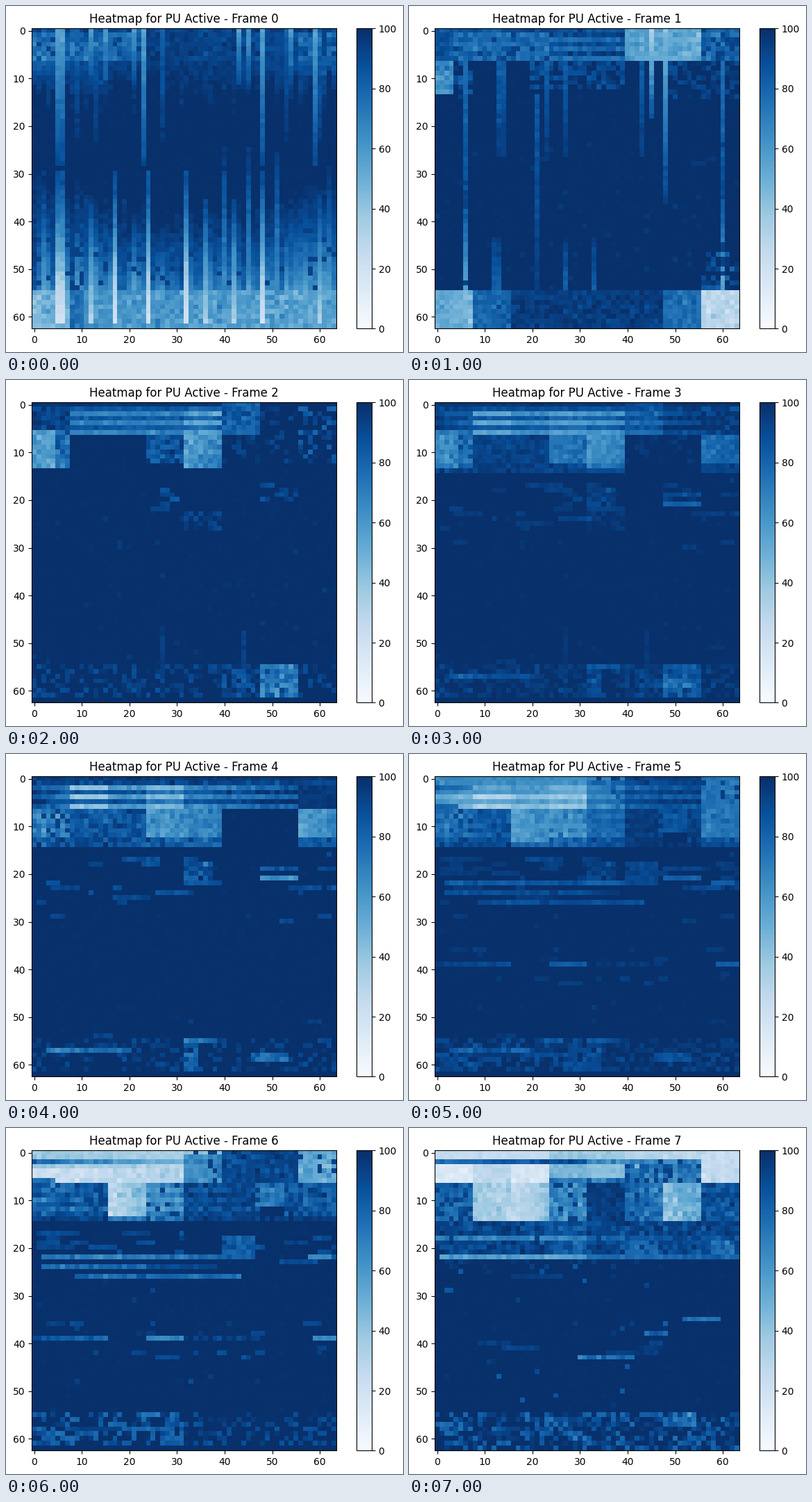
A matplotlib script that plays this animation: 572x498 px, repeating every 8000 ms.

```python
import numpy as np
import matplotlib.pyplot as plt
from matplotlib.animation import FuncAnimation

W, H, DPI = 572, 498, 100
ROWS, COLS = 63, 64
TOP, MID, LOW, BASE = slice(0, 7), slice(7, 15), slice(15, 24), slice(55, 62)
INNER = slice(24, 55)


class Grid:
    """Activity map of eight sections, each eight columns wide."""

    def __init__(self, seed):
        self.rng = np.random.default_rng(seed)
        self.v = 100 - np.abs(self.rng.normal(0, 0.5, (ROWS, COLS)))

    def part(self, rows, a, b):
        if isinstance(rows, int):
            rows = slice(rows, rows + 1)
        return self.v[rows, round(8 * a):round(8 * b)]

    def block(self, rows, a, b, level, end=None, noise=4, stripe=0):
        """Fill sections a to b, from level to end; stripe darkens every other row."""
        p = self.part(rows, a, b)
        ramp = np.linspace(level, level if end is None else end, p.shape[1])
        p[:] = ramp + self.rng.normal(0, noise, p.shape)
        p[1::2] += stripe

    def sparks(self, rows, a, b, level, share):
        p = self.part(rows, a, b)
        light = self.rng.uniform(level, 98, p.shape)
        p[:] = np.where(self.rng.random(p.shape) < share, np.minimum(p, light), p)

    def gaps(self, rows, a, b, share):
        p = self.part(rows, a, b)
        p[:] = np.where(self.rng.random(p.shape) < share, np.maximum(p, 93), p)

    def dashes(self, rows, a, b, count, level, longest=8):
        for _ in range(count):
            r = self.rng.integers(rows.start, rows.stop)
            c = self.rng.uniform(a, b)
            size = self.rng.integers(1, longest + 1) / 8
            self.block(int(r), c, min(c + size, b), self.rng.uniform(level, 95), noise=2)

    def streak(self, c, r0, r1, start, end, power=1.0):
        t = np.linspace(0, 1, r1 - r0)
        fade = start + (end - start) * t ** power + self.rng.normal(0, 2, r1 - r0)
        self.v[r0:r1, c] = np.minimum(self.v[r0:r1, c], fade)


def stage_0():
    g = Grid(10)
    g.block(TOP, 0, 3, 79, noise=6)
    g.block(TOP, 3, 7, 95, 90, noise=3)
    g.block(TOP, 7, 8, 80, noise=6)
    g.block(0, 0, 8, 88, 96)
    g.gaps(TOP, 0, 8, 0.12)
    g.block(BASE.start, 0, 8, 58)
    g.block(slice(55, 63), 0, 1, 49, noise=5)
    g.block(slice(55, 63), 1, 4, 61, noise=5)
    g.block(slice(55, 63), 4, 8, 58, 54, noise=5)
    g.block(slice(55, 63), 1, 1.4, 74)

    for c in range(COLS):
        mid = np.sin(np.pi * c / COLS)
        g.streak(c, 7, 10 + int(g.rng.integers(0, 9)), 82 + 14 * mid, 98)
        start = 29 + int(9 * mid + g.rng.integers(0, 6))
        g.streak(c, start, 55, 98, g.rng.normal(60 + 13 * mid, 8), 1.3)
    g.gaps(slice(36, 55), 0, 8, 0.08)
    g.gaps(slice(38, 55), 1, 1.4, 0.5)

    for c in (5, 6, 23, 48, 59):
        g.streak(c, 0, 29, 56, 90)
    for c in (12, 15, 21, 43, 45, 54):
        g.streak(c, 0, 14, 58, 96)
    for c in (9, 13, 27, 53, 60):
        g.streak(c, 0, 24, 82, 96)
    for c in (5, 6, 17, 24, 32, 48):
        g.streak(c, 30, 55, 88, 30, 1.3)
        g.streak(c, 55, 62, 28, 18)
    for c in (12, 36, 42, 60):
        g.streak(c, 36, 62, 92, 32)
    for c in (40, 45, 51):
        g.streak(c, 25, 55, 96, 64)
    return g.v


def stage_1():
    g = Grid(21)
    g.block(TOP, 0, 0.5, 88)
    g.block(TOP, 0.5, 3, 78, noise=5)
    g.block(TOP, 3, 5, 78, stripe=13)
    g.block(TOP, 5, 7, 58, 52, noise=5)
    g.block(TOP, 7, 8, 80, noise=6)
    g.block(0, 0, 5, 88)
    g.gaps(TOP, 1, 3, 0.1)
    g.gaps(TOP, 7, 8, 0.2)
    g.block(slice(7, 14), 0, 0.5, 64, noise=5)
    g.sparks(MID, 0.5, 1, 76, 0.6)
    g.sparks(slice(7, 13), 2.5, 5, 84, 0.65)
    g.sparks(MID, 6, 8, 88, 0.5)
    g.sparks(INNER, 0, 8, 95, 0.02)
    g.sparks(slice(47, 55), 7, 8, 78, 0.6)

    base = slice(55, 63)
    g.block(base, 0, 1, 54, 47)
    g.block(base, 1, 2, 81)
    g.block(base, 2, 6, 95, noise=3)
    g.block(base, 6, 7, 77)
    g.block(base, 7, 8, 29)

    for c in (13, 14, 23, 27, 43):
        g.streak(c, 7, 27, 82, 95)
    for c in (12, 13, 27, 33):
        g.streak(c, 44, 55, 94, 82)
    for c in (6, 60):
        g.streak(c, 7, 35, 76, 89)
        g.streak(c, 35, 55, 89, 54)
        g.gaps(INNER, c / 8, (c + 1) / 8, 0.15)
    g.streak(21, 14, 55, 86, 94)
    g.streak(45, 0, 19, 32, 86)
    g.streak(48, 0, 37, 46, 94)
    return g.v


def stage_2():
    g = Grid(32)
    g.block(TOP, 0, 1, 94)
    g.block(TOP, 1, 4, 69, stripe=16, noise=3)
    g.block(TOP, 4, 5, 57, stripe=24)
    g.block(TOP, 5, 6, 83, noise=5)
    g.block(0, 0, 5, 98, noise=1)
    g.block(slice(6, 14), 0, 0.6, 58, noise=5)
    g.block(slice(6, 14), 0.6, 1, 77, noise=8)
    g.block(slice(7, 13), 3, 4, 86, noise=6)
    g.block(slice(7, 14), 4, 5, 58, 68, noise=6)
    g.sparks(slice(0, 13), 5, 7, 90, 0.25)
    g.sparks(slice(1, 13), 7, 8, 78, 0.5)

    g.dashes(slice(17, 23), 3, 4, 6, 84, 4)
    g.dashes(slice(17, 22), 6, 7, 8, 84, 4)
    g.sparks(slice(23, 27), 4, 5, 88, 0.5)
    g.sparks(INNER, 0, 8, 95, 0.01)
    g.sparks(BASE, 0, 8, 87, 0.35)
    g.sparks(BASE, 5, 6, 78, 0.5)
    g.block(BASE, 6, 7, 73, noise=8)
    for c in (27, 44):
        g.streak(c, 47, 62, 96, 91)
    return g.v


def stage_4():
    g = Grid(43)
    g.block(TOP, 0, 1, 86, 70, stripe=14)
    for a, level, stripe in [(1, 40, 44), (2, 60, 28), (3, 47, 26)]:
        g.block(TOP, a, a + 1, level, stripe=stripe, noise=3)
    g.block(TOP, 4, 7, 66, 82, stripe=18)
    g.block(TOP, 7, 8, 96, noise=2)
    g.block(0, 0, 8, 96, noise=2)
    g.block(1, 0, 8, 92)
    g.block(MID, 0, 1, 70, noise=7)
    g.block(MID, 1, 3, 85, noise=5)
    g.block(MID, 3, 5, 60, 70, noise=5)
    g.block(MID, 7, 8, 56, 68, noise=5)
    g.block(slice(13, 15), 0, 5, 84, noise=6)
    g.block(slice(13, 15), 7, 8, 84)
    g.gaps(MID, 0, 3, 0.15)

    g.dashes(slice(17, 26), 0, 5, 16, 87)
    g.block(slice(18, 23), 4, 4.75, 87, noise=6)
    g.block(19, 6, 7, 86)
    g.block(21, 6, 7, 67)
    g.dashes(LOW, 6, 8, 6, 88)
    g.dashes(INNER, 0, 8, 10, 91, 4)
    g.sparks(BASE, 0, 8, 88, 0.3)
    g.block(57, 0.4, 2.6, 68, 80)
    g.block(55, 4, 4.9, 75)
    g.block(slice(56, 62), 4, 4.4, 83, noise=6)
    g.block(slice(58, 60), 5.8, 6.8, 78, noise=6)
    return g.v


def stage_6():
    g = Grid(54)
    g.block(TOP, 0, 4, 20, 33)
    g.block(slice(0, 2), 0, 4, 38, 34, noise=3)
    g.block(2, 0, 4, 78, 48)
    g.block(3, 0, 4, 38, 31)
    g.block(6, 0, 0.6, 78)
    g.block(TOP, 4, 5, 66, noise=5)
    g.block(0, 4, 5, 43)
    g.block(TOP, 5, 7, 91, noise=5)
    g.block(TOP, 7, 8, 54, noise=6)
    g.gaps(TOP, 4, 8, 0.1)

    g.block(MID, 0, 2, 84, stripe=-6, noise=6)
    g.block(MID, 2, 3, 28, 43)
    g.block(MID, 3, 4, 70, stripe=-9, noise=5)
    g.block(MID, 4, 6, 92, stripe=-5, noise=4)
    g.block(slice(7, 12), 5.9, 6.6, 74, noise=5)
    g.block(MID, 6.6, 8, 85, noise=6)
    g.block(14, 0, 2, 93)
    g.block(14, 2, 4, 74, noise=6)
    g.block(14, 4, 8, 95)
    g.gaps(MID, 0, 2, 0.13)
    g.gaps(MID, 3, 8, 0.12)

    g.dashes(slice(17, 22), 0, 4, 16, 84)
    g.dashes(slice(17, 24), 5, 8, 10, 86)
    g.block(slice(18, 23), 5, 5.9, 82, noise=5)
    g.block(22, 0.2, 5, 70, 78)
    g.block(22, 7.3, 7.9, 66)
    g.block(24, 0.2, 3, 78)
    g.block(24, 3, 4.9, 92)
    g.block(26, 1.1, 5.5, 80, 76)
    g.block(39, 0, 2, 88, 76)
    g.block(39, 3, 4, 67)
    g.block(39, 4, 6, 93)
    g.block(39, 7.4, 8, 66)
    g.dashes(slice(35, 45), 0, 8, 14, 88, 5)
    g.sparks(INNER, 0, 8, 88, 0.006)
    g.sparks(BASE, 0, 4, 76, 0.5)
    g.sparks(BASE, 4, 8, 85, 0.4)
    g.dashes(BASE, 0, 4, 8, 70)
    return g.v


def stage_7():
    g = Grid(65)
    for a, level in enumerate((14, 28, 17, 45, 42, 74, 76, 25)):
        g.block(TOP, a, a + 1, level, noise=9 if a in (5, 6) else 3)
    g.block(slice(0, 2), 0, 3, 25, noise=2)
    g.block(slice(0, 2), 3, 5, 38, noise=3)
    g.block(slice(0, 2), 5, 8, 32, 22, noise=3)
    g.block(2, 0, 4, 76, 90)
    g.block(2, 4, 7, 66)
    g.block(6, 3, 7, 72, noise=7)
    g.gaps(slice(2, 7), 5, 7, 0.15)

    g.block(MID, 0, 1, 82, noise=6)
    g.block(MID, 1, 2, 38, 31)
    g.block(MID, 2, 3, 26, 42)
    g.block(MID, 3, 4, 67, noise=6)
    g.block(MID, 4, 5, 95, noise=3)
    g.block(MID, 5, 6, 82, 74, noise=6)
    g.block(MID, 6, 7, 40, 55, noise=5)
    g.block(MID, 7, 8, 87, noise=5)
    g.gaps(MID, 0, 1, 0.25)
    g.gaps(MID, 3, 4, 0.15)

    g.block(slice(15, 22), 0, 8, 91, noise=5)
    g.block(slice(15, 22), 3, 4, 84, noise=5)
    g.block(slice(18, 22), 5, 5.9, 80)
    g.block(slice(19, 22), 7.3, 7.9, 76, noise=6)
    g.block(18, 0, 4, 69)
    g.block(18, 4, 8, 80, 85)
    g.block(22, 0.1, 4, 57)
    g.block(22, 4, 8, 76, 82)
    g.gaps(slice(15, 22), 0, 8, 0.15)
    g.sparks(slice(23, 25), 0, 6, 92, 0.15)

    g.block(26, 2, 3.4, 95, noise=1)
    g.block(35, 6.5, 7.5, 74)
    g.block(38, 5.5, 6.1, 83)
    g.block(43, 3.8, 5.2, 78, noise=6)
    g.dashes(slice(40, 44), 1, 6, 6, 91)
    g.sparks(INNER, 0, 8, 82, 0.015)
    g.sparks(slice(55, 63), 0, 8, 76, 0.55)
    g.dashes(slice(55, 61), 0, 4, 14, 70, 6)
    g.block(slice(55, 58), 6, 6.9, 78, noise=8)
    g.gaps(slice(55, 63), 0, 8, 0.2)
    return g.v


maps = {0: stage_0(), 1: stage_1(), 2: stage_2(),
        4: stage_4(), 6: stage_6(), 7: stage_7()}
for k in (3, 5):
    maps[k] = (maps[k - 1] + maps[k + 1]) / 2

fig = plt.figure(figsize=(W / DPI, H / DPI), dpi=DPI)


def place(x, top, w, h):
    return fig.add_axes([x / W, 1 - (top + h) / H, w / W, h / H])


ax = place(37.28, 32.4, 432 * COLS / ROWS, 432)
image = ax.imshow(maps[0], cmap="Blues", vmin=0, vmax=100,
                  aspect="auto", interpolation="nearest")
fig.colorbar(image, cax=place(505.2, 32.4, 21.6, 432))
title = ax.set_title("")


def draw(i):
    image.set_data(np.clip(maps[i], 0, 100))
    title.set_text(f"Heatmap for PU Active - Frame {i}")
    return image, title


anim = FuncAnimation(fig, draw, frames=8, interval=1000, repeat=True, repeat_delay=0)
plt.show()
```
